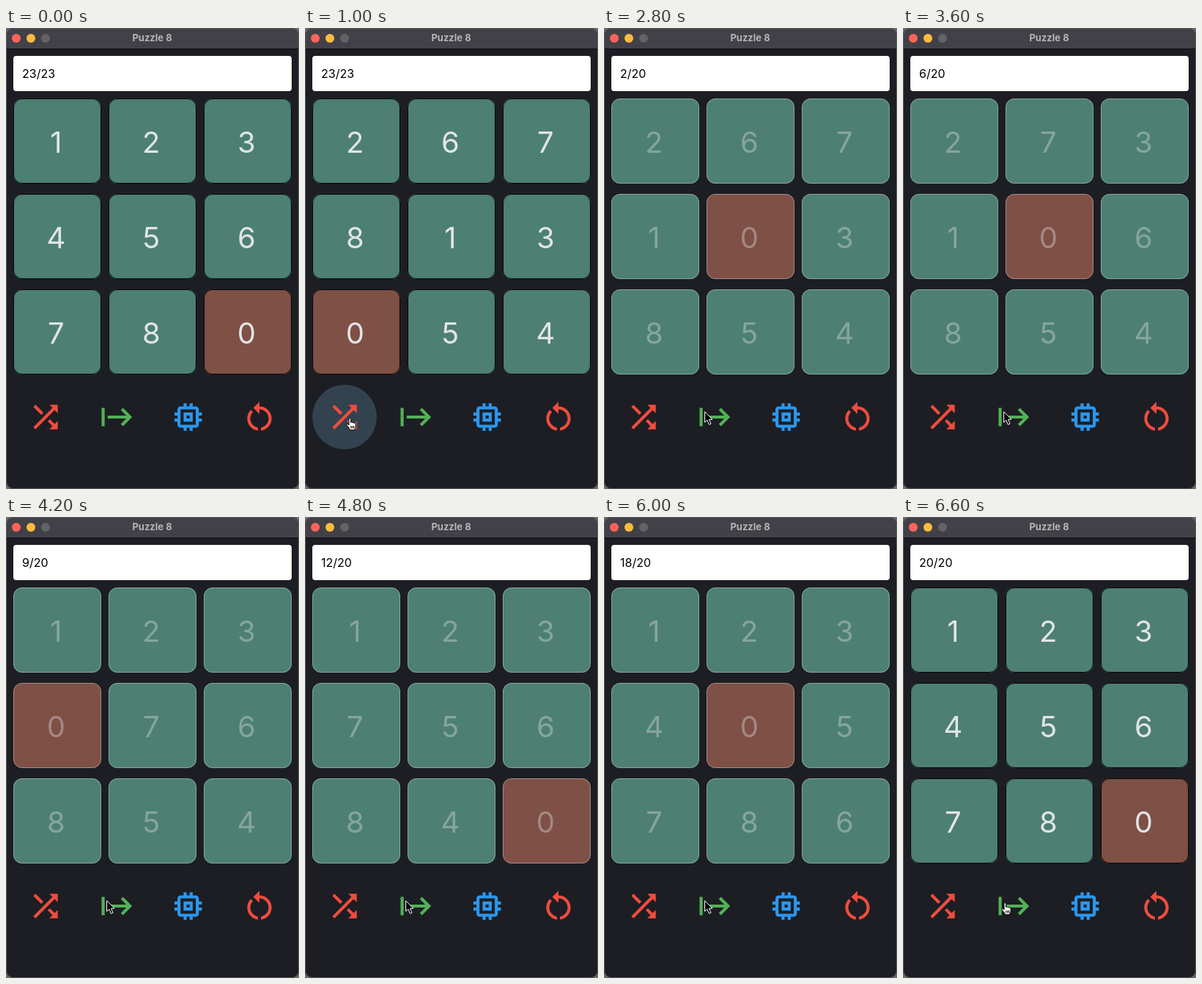
An HTML page that plays this animation: 400 by 628 pixels, repeating every 6.7 s.

```html
<!DOCTYPE html>
<html lang="en">
<head>
<meta charset="utf-8">
<title>Puzzle 8</title>
<style>
  html, body { margin: 0; width: 100%; height: 100%; overflow: hidden; background: #6b6b6e; }
  svg { display: block; width: 400px; height: 628px; font-family: Inter, Roboto, sans-serif; }
  .title { font-size: 13px; font-weight: 700; fill: #b6b5b9; text-anchor: middle; }
  .count { font-size: 16px; fill: #000; }
  .tile text { font-size: 40px; fill: #e1e4e6; text-anchor: middle; }
</style>
</head>
<body>
<svg id="stage" viewBox="0 0 400 628">
  <rect width="400" height="628" rx="10" fill="#1c1e23"/>
  <path d="M0 28V10A10 10 0 0 1 10 0H390A10 10 0 0 1 400 10V28Z" fill="#424147"/>
  <rect y="28" width="400" height="1" fill="#0c0d10"/>
  <rect x=".5" y=".5" width="399" height="627" rx="9.5" fill="none" stroke="#56565b"/>
  <circle cx="14" cy="14" r="6" fill="#fe645b"/>
  <circle cx="34" cy="14" r="6" fill="#fdbc40"/>
  <circle cx="54" cy="14" r="6" fill="#636267"/>
  <text class="title" x="199.5" y="18">Puzzle 8</text>
  <rect x="10" y="38" width="380" height="48" rx="4" fill="#fff"/>
  <text class="count" id="count" x="22" y="68"></text>
  <g id="board"></g>
  <g id="buttons"></g>
  <path id="hand" fill="#fff" stroke="#000" stroke-linejoin="round"
    d="M4 2.2c0-2 2.6-2 2.6 0v4.3c.3-1 2.3-.9 2.4.4.5-.9 2.2-.6 2.2.6.6-.6 1.9-.3 1.9 1v3c0 2-1 2.8-1.3 4v1.2H5.2v-1.3C4.2 14 2.8 12 1.2 10.2.2 9 1.7 7.8 2.8 8.8L4 10zM6.8 11v3.5M8.7 11v3.5M10.6 11v3.5"/>
  <path id="arrow" fill="#000" stroke="#fff" stroke-linejoin="round"
    d="M.6 .8V15.2L3.9 12.1L6.4 18.2L9 17.1L6.5 11.2H11Z"/>
</svg>
<script>
const LOOP = 6700, STEP = 200, PLAY = 2400, DONE = 6600;
const SOLVED = '123456780', SHUFFLED = '267813054';
const MOVES = 'URURDLULDRDRULDLURRD';
const SHIFT = { U: -3, D: 3, L: -1, R: 1 };

// start time, pointer, x, y, hovered button
const POINTER = [
  [0, '', 0, 0, -1],
  [400, 'hand', 48, 562, 0],
  [600, 'hand', 56, 531, 0],
  [1200, 'hand', 62, 533, 0],
  [1400, 'arrow', 102, 529, -1],
  [1600, 'hand', 130, 528, 1],
  [1800, 'hand', 134, 525, 1],
  [2190, 'arrow', 137, 522, -1],
  [DONE, 'hand', 134, 525, -1]
];

const ICONS = [
  ['#f04c3e', 'M10.59 9.17 5.41 4 4 5.41l5.17 5.17zM14.5 4l2.04 2.04L4 18.59 5.41 20 17.96 7.46 20 9.5V4zM14.83 13.41l-1.41 1.41 3.13 3.13L14.5 20H20v-5.5l-2.04 2.04z'],
  ['#53b157', 'M14.59 7.41 18.17 11H6v2h12.17l-3.58 3.59L16 18l6-6-6-6zM2 6v12h2V6z'],
  ['#2b97f0', 'M15 9H9v6h6zm-2 4h-2v-2h2zm8-2V9h-2V7c0-1.1-.9-2-2-2h-2V3h-2v2h-2V3H9v2H7c-1.1 0-2 .9-2 2v2H3v2h2v2H3v2h2v2c0 1.1.9 2 2 2h2v2h2v-2h2v2h2v-2h2c1.1 0 2-.9 2-2v-2h2v-2h-2v-2zm-4 6H7V7h10z'],
  ['#f04c3e', 'M12 5V2L8 6l4 4V7c3.31 0 6 2.69 6 6 0 2.97-2.17 5.43-5 5.91v2.02c3.95-.49 7-3.85 7-7.93 0-4.42-3.58-8-8-8zM6 13c0-1.65.67-3.15 1.76-4.24L6.34 7.34C4.9 8.79 4 10.79 4 13c0 4.08 3.05 7.44 7 7.93v-2.02c-2.83-.48-5-2.94-5-5.91z']
];

const $ = id => document.getElementById(id);

function add(parent, tag, attrs) {
  const el = document.createElementNS('http://www.w3.org/2000/svg', tag);
  for (const k in attrs) el.setAttribute(k, attrs[k]);
  return parent.appendChild(el);
}

const tiles = Array.from({ length: 9 }, (_, i) => {
  const x = 10 + 130 * (i % 3), y = 96 + 130 * Math.floor(i / 3);
  const g = add($('board'), 'g', { class: 'tile' });
  return {
    face: add(g, 'rect', { x, y, width: 120, height: 116, rx: 12 }),
    edge: add(g, 'rect', { x: x + .5, y: y + .5, width: 119, height: 115, rx: 11.5, fill: 'none' }),
    label: add(g, 'text', { x: x + 58.3, y: y + 73.5 })
  };
});

const halos = ICONS.map(([fill, d], i) => {
  const x = 54 + i * 292 / 3;
  const halo = add($('buttons'), 'circle', { cx: x, cy: 530, r: 44, fill: '#33424f' });
  add($('buttons'), 'path', { d, fill, transform: `translate(${x - 25} 505) scale(${50 / 24})` });
  return halo;
});

function slide(board, move) {
  const cells = [...board], from = cells.indexOf('0'), to = from + SHIFT[move];
  [cells[from], cells[to]] = [cells[to], cells[from]];
  return cells.join('');
}

const boards = [SHUFFLED];
for (const move of MOVES) boards.push(slide(boards[boards.length - 1], move));

function draw(t) {
  const step = Math.min(MOVES.length, Math.max(0, Math.floor((t - PLAY) / STEP)));
  const locked = t >= 1990 && t < DONE;
  const ink = !locked ? 1 : t < 2190 ? .7 : .38;
  const board = t < 1000 ? SOLVED : boards[step];

  $('count').textContent = t < 1990 ? '23/23' : `${step}/${MOVES.length}`;
  tiles.forEach(({ face, edge, label }, i) => {
    face.setAttribute('fill', board[i] === '0' ? '#7f5046' : '#4d7f73');
    edge.setAttribute('stroke', locked ? 'rgba(225,228,230,.4)' : '#050607');
    label.textContent = board[i];
    label.setAttribute('fill-opacity', ink);
  });

  const [, kind, x, y, hover] = POINTER.filter(p => p[0] <= t).pop();
  halos.forEach((halo, i) => halo.setAttribute('visibility', i === hover ? 'visible' : 'hidden'));
  for (const id of ['hand', 'arrow']) {
    $(id).setAttribute('visibility', id === kind ? 'visible' : 'hidden');
    $(id).setAttribute('transform', `translate(${x} ${y})`);
  }
}

const start = performance.now();
function tick() {
  draw((performance.now() - start) % LOOP);
  requestAnimationFrame(tick);
}
tick();
</script>
</body>
</html>
```
